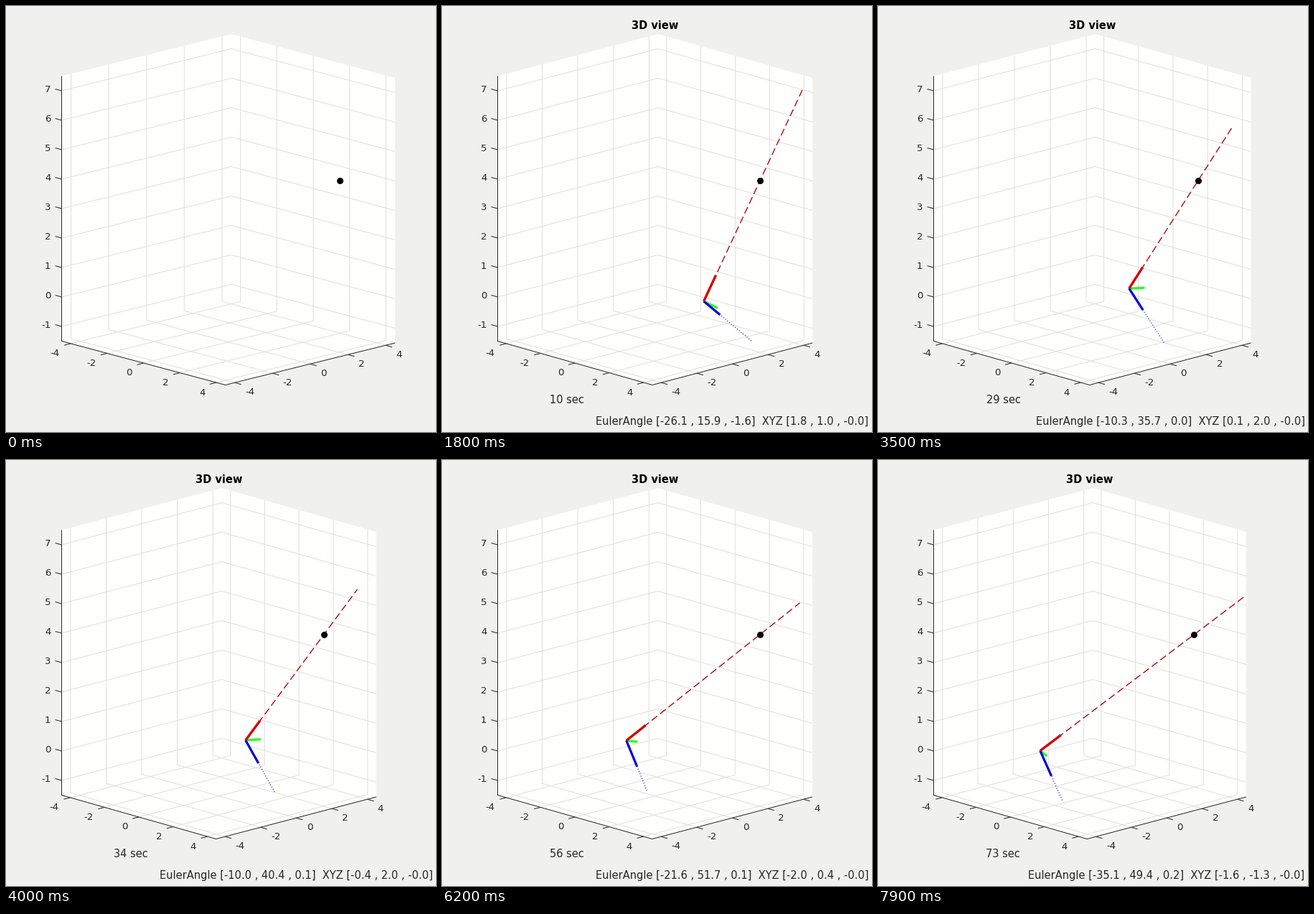
Animation, 599 px wide and 593 px high, one loop 8000 ms. Source, as a matplotlib script:

```python
import numpy as np
import matplotlib.pyplot as plt
from matplotlib.animation import FuncAnimation
from matplotlib.collections import LineCollection

W, H, DPI = 599, 593, 64
PT = 72 / DPI                      # points per pixel
LEFT, FULL_RIGHT, TEXT_EDGE = 77.5, 542.0, 594.5
SPLIT = 0.4909                     # share of the width taken by the x axis
XDROP, YRISE, ZUNIT = 6.78, 6.5, 41.0
LO = np.array([-4.5, -4.5, -1.5])
HI = np.array([4.5, 4.5, 7.5])
BALL = np.array([3.0, 3.0, 4.0])
XY_TICKS = range(-4, 5, 2)
Z_TICKS = range(-1, 8)
INK, BACK, WALL, GRID = "#262626", "#f0f0ee", "#fffffd", "#dfdfdd"

# ticks of the clock on which the motion stalls
STALLS = np.array([24, 30, 36, 41, 45, 51, 55, 61, 66, 69, 78])
START, SHOW = 10, 7

# way points of the orbit, by step
STEP = [0, 8, 18, 27, 38, 49, 58]
SEC = [0, 10, 23, 34, 49, 62, 73]
ORBIT = [0, 28.7, 68.1, 101, 146.5, 185.5, 218.6]
ORBIT_R = [2.0] + [2.03] * 6
AIM = [0, 27.36, 68.55, 101, 146.5, 185.5, 218.4]
AIM_R = [2.1, 2.094, 2.117, 2.11, 2.1, 2.11, 2.126]
YAW = [0, -1.6, -0.02, 0.1, 0.02, 0.1, 0.2]
LEAD = 3.0

plt.rcParams["font.family"] = "DejaVu Sans"
fig = plt.figure(figsize=(W / DPI, H / DPI), dpi=DPI, facecolor=BACK)
ax = fig.add_axes([0, 0, 1, 1])
ax.set_xlim(0, W)
ax.set_ylim(H, 0)
ax.axis("off")


def label(text="", size=13.333, **kw):
    return ax.text(0, 0, text, fontsize=size * PT, color=kw.pop("color", INK),
                   va="baseline", zorder=3, **kw)


def stroke(color, width, z, style="-"):
    return ax.plot([], [], color=color, lw=width * PT, ls=style, zorder=z,
                   solid_capstyle="butt", dash_capstyle="butt")[0]


panel = ax.fill([0, 1, 1], [0, 0, 1], color=WALL, lw=0, zorder=0)[0]
grid = ax.add_collection(LineCollection([], colors=GRID, linewidths=PT, zorder=1))
rules = ax.add_collection(LineCollection([], colors=INK, linewidths=PT, zorder=2))
x_labels = [label(str(v), ha="right") for v in XY_TICKS]
y_labels = [label(str(v), ha="left") for v in XY_TICKS]
z_labels = [label(str(v), ha="right") for v in Z_TICKS]

title = label("3D view", 14.667, ha="center", weight="bold", color="black")
clock = label("", 14.667, ha="center")
status = label("", 14.667, ha="right")

beam = stroke("#a80014", 1.35, 4, (0, (7.4, 3.7)))
trail = stroke("#000080", 1.2, 4, (0, (0.85, 2.1)))
body = [stroke("#20ff20", 3.2, 5), stroke("#0000dc", 3.2, 6), stroke("#d40000", 3.4, 7)]
dot = ax.plot([], [], "o", color="black", ms=9 * PT, mew=0, zorder=8)[0]


def project(p, right):
    x, y, z = np.asarray(p, float) - LO
    unit = (right - LEFT) / 9
    return np.array([LEFT + unit * (SPLIT * x + (1 - SPLIT) * y),
                     466.5 + XDROP * x - YRISE * y - ZUNIT * z])


def draw_box(right):
    def at(x, y, z):
        return project((x, y, z), right)

    l, h, b, t = -4.5, 4.5, -1.5, 7.5
    panel.set_xy([at(l, l, t), at(l, h, t), at(h, h, t),
                  at(h, h, b), at(h, l, b), at(l, l, b)])
    lines = []
    for v in XY_TICKS:
        lines.append([at(l, v, t), at(l, v, b), at(h, v, b)])
        lines.append([at(v, h, t), at(v, h, b), at(v, l, b)])
    for v in Z_TICKS:
        lines.append([at(l, l, v), at(l, h, v), at(h, h, v)])
    grid.set_segments(lines)

    marks = [[at(l, l, t), at(l, l, b), at(h, l, b), at(h, h, b)]]
    for v, xl, yl in zip(XY_TICKS, x_labels, y_labels):
        p, q = at(v, l, b), at(h, v, b)
        marks += [[p, p + (-9, 2.3)], [q, q + (9, 2.5)]]
        xl.set_position(p + (-15.5, 17.4))
        yl.set_position(q + (14.5, 17.2))
    for v, zl in zip(Z_TICKS, z_labels):
        p = at(l, l, v)
        marks.append([p, p + (-9, -2.4)])
        zl.set_position(p + (-15, 2.4))
    rules.set_segments(marks)
    dot.set_data(*project(BALL, right)[:, None])


def polar(radius, deg):
    a = np.radians(deg)
    return np.array([radius * np.cos(a), radius * np.sin(a), 0.0])


def look(p):
    """Roll and pitch that turn the body z axis towards the ball."""
    dx, dy, dz = BALL - p
    return np.array([-np.arctan2(dy, np.hypot(dx, dz)), np.arctan2(dx, dz)])


def body_axes(roll, pitch):
    sr, cr, sp, cp = np.sin(roll), np.cos(roll), np.sin(pitch), np.cos(pitch)
    return np.array([[cp, 0, -sp], [sp * sr, cr, cp * sr], [sp * cr, -sr, cp * cr]])


def reach(p, d):
    """Point where the ray from p along d leaves the box."""
    dist = [((HI if c > 0 else LO)[i] - p[i]) / c
            for i, c in enumerate(d) if abs(c) > 1e-9]
    return p + min(dist) * d


def draw_body(p, angles, right):
    def segment(line, end):
        line.set_data(*np.transpose([project(p, right), project(end, right)]))

    ex, ey, ez = body_axes(*angles)
    segment(trail, reach(p, ex))
    segment(beam, reach(p, ez))
    for line, d in zip(body, (ey, ex, ez)):
        segment(line, p + d)


def update(i):
    step = i - START - np.count_nonzero(STALLS <= i)
    running = i >= START
    for art in (title, clock, status):
        art.set_visible(running)
    for art in (beam, trail, *body):
        art.set_visible(i >= SHOW)

    if not running:
        draw_box(FULL_RIGHT)
        draw_body(polar(2, 0), (0, 0), FULL_RIGHT)
        return []

    def key(values):
        return float(np.interp(step, STEP, values))

    sec = key(SEC)
    lock = 1 - np.exp(-(sec / 3.5) ** 2)     # first swing onto the ball
    pos = polar(key(ORBIT_R), key(ORBIT))
    roll, pitch = np.degrees(look(polar(key(AIM_R), key(AIM))) * lock)
    status.set_text(f"EulerAngle [{roll:.1f} , {pitch:.1f} , {key(YAW):.1f}]"
                    f"  XYZ [{pos[0]:.1f} , {pos[1]:.1f} , -0.0]")
    clock.set_text(f"{round(sec)} sec")

    # the plot shrinks until the status line, centred on the y axis, fits
    width = status.get_window_extent().width * DPI / fig.dpi
    room = (TEXT_EDGE - width / 2 - LEFT) / ((1 + SPLIT) / 2)
    right = min(FULL_RIGHT, LEFT + room)
    draw_box(right)
    status.set_position((TEXT_EDGE, 583))
    clock.set_position((LEFT + (right - LEFT) * SPLIT / 2 - 10.7, 553))
    title.set_position(((LEFT + right) / 2, 32.3))

    ahead = polar(key(ORBIT_R), key(ORBIT) + LEAD)
    draw_body(ahead, look(ahead) * lock, right)
    return []


anim = FuncAnimation(fig, update, frames=80, interval=100, repeat=True,
                     repeat_delay=0, init_func=lambda: update(0), blit=False)
plt.show()
```
